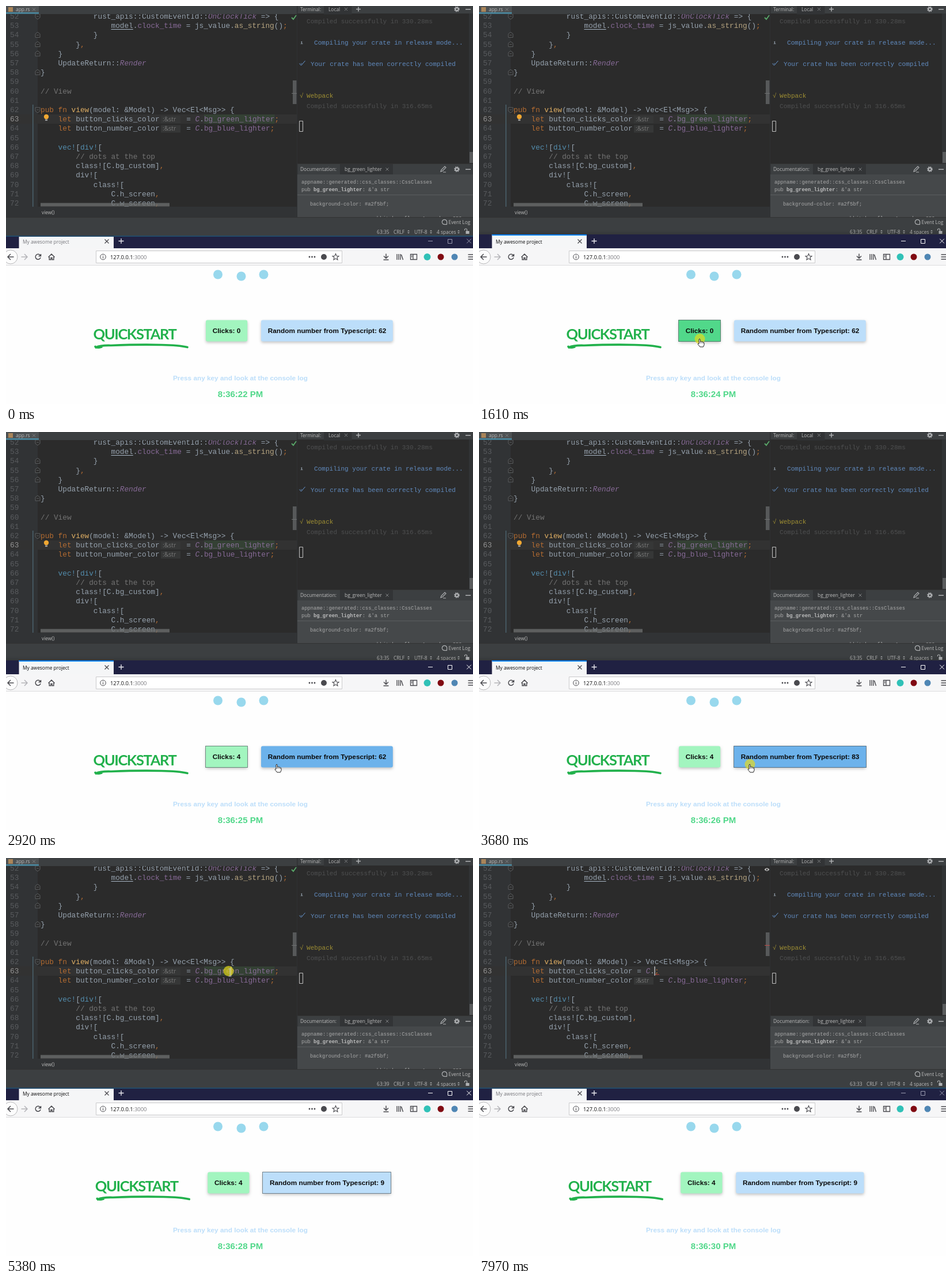
An HTML page with a canvas that plays this animation: 811x690 px, repeating every 8000 ms.

```html
<!DOCTYPE html>
<html lang="en">
<head>
<meta charset="utf-8">
<title>Quickstart demo</title>
<style>
html, body { margin: 0; width: 100%; height: 100%; overflow: hidden; background: #fff; }
canvas { display: block; }
</style>
</head>
<body>
<canvas id="stage" width="811" height="690"></canvas>
<script>
const ctx = document.getElementById('stage').getContext('2d');
const LOOP = 8000, CHAR = 7.656, LINE = 16.2;
const MONO = '"Liberation Mono", monospace';
const UI = '8.4px "Open Sans", sans-serif';
const CODE = '12.76px ' + MONO, TERM = '11.06px ' + MONO, DOC = '8.8px ' + MONO;
const BOLD = 'bold 11.8px "Liberation Sans", sans-serif';
const PLAIN = '#a9b7c6', KEY = '#cc7832', FIELD = '#9876aa', GREY = '#808080', LABEL = '#bbbbbb';

const TICKS = [230, 1230, 2230, 3220, 4220, 5150, 6210, 7200];
const PRESSES = [[1610, 1690], [1765, 1840], [2070, 2150], [2225, 2300],
  [3220, 3300], [3680, 3760], [3910, 3990], [5380, 5460], [5540, 5620]];
const PATH = [[150, 553, 688], [920, 383, 577], [2310, 383, 577], [2460, 450, 577], [2690, 470, 576],
  [4370, 470, 576], [4380, 470, 552], [5150, 386, 196]];

const between = (t, a, b) => t >= a && t < b;

function rect(x, y, w, h, color) {
  ctx.fillStyle = color;
  ctx.fillRect(x, y, w, h);
}

// Monospaced text is drawn lighter, like a thin typewriter face.
function text(s, x, y, color, font = UI, align = 'left') {
  ctx.font = font;
  ctx.textAlign = align;
  ctx.fillStyle = color;
  ctx.globalAlpha = font.includes('Mono') ? .85 : 1;
  ctx.fillText(s, x, y);
  ctx.globalAlpha = 1;
}

function disc(x, y, r, color) {
  ctx.beginPath();
  ctx.arc(x, y, r, 0, 7);
  ctx.fillStyle = color;
  ctx.fill();
}

// Strokes or fills an SVG path placed at x, y.
function shape(d, x, y, stroke, width = 1, fill) {
  const p = new Path2D(d);
  ctx.save();
  ctx.translate(x, y);
  if (fill) { ctx.fillStyle = fill; ctx.fill(p); }
  if (stroke) { ctx.strokeStyle = stroke; ctx.lineWidth = width; ctx.stroke(p); }
  ctx.restore();
}

const cross = (x, y, r, color, w) => shape(`M${-r} ${-r}L${r} ${r}M${r} ${-r}L${-r} ${r}`, x, y, color, w);
const plus = (x, y, r, color, w) => shape(`M${-r} 0H${r}M0 ${-r}V${r}`, x, y, color, w);

function gear(x, y) {
  ctx.setLineDash([1.8, 1.34]);
  shape('M4 0A4 4 0 1 1 -4 0A4 4 0 1 1 4 0', x, y, '#afb1b3', 1.6);
  ctx.setLineDash([]);
  shape('M2.6 0A2.6 2.6 0 1 1 -2.6 0A2.6 2.6 0 1 1 2.6 0', x, y, '#afb1b3', 2);
}

const lineY = n => 184 + (n - 62) * LINE;

// Writes alternating string / colour pairs; '/' before a colour means italic.
function code(n, x, ...parts) {
  for (let i = 0; i < parts.length; i += 2) {
    const italic = parts[i + 1][0] === '/';
    text(parts[i], x, lineY(n), parts[i + 1].replace('/', ''), (italic ? 'italic ' : '') + CODE);
    x += parts[i].length * CHAR;
  }
}

const col = c => 60 + c * CHAR;

function letLine(n, name, hint, value, bg) {
  code(n, col(4), 'let ', KEY, name, PLAIN);
  let x = col(27);
  if (hint) {
    rect(269, lineY(n) - 10, 34, 13, '#363737');
    text(':&str', 272, lineY(n) - .5, '#787878', '10.4px "Open Sans", sans-serif');
    x = 305.6;
  }
  if (bg) rect(344, 188, 122.5, 16, bg);
  const dot = value[0] === '.' ? '.' : '';
  code(n, x, ' = ', PLAIN, 'C', '/' + FIELD, dot, PLAIN, value.slice(dot.length), FIELD, ';', KEY);
}

function drawEditor(t) {
  rect(0, 0, 811, 400, '#3c3f41');
  rect(0, 14, 505, 334, '#2b2b2b');
  rect(0, 14, 55, 334, '#313335');
  rect(0, 188, 505, 16, '#323232');
  rect(46, 171, 1.5, 177, '#4a626d');

  ctx.save();
  ctx.beginPath();
  ctx.rect(0, 14, 505, 334);
  ctx.clip();
  for (let n = 52; n <= 72; n++) text(n, 7, lineY(n), n === 63 ? '#a4a3a3' : '#606366', CODE);
  for (const n of [52, 54, 55, 56, 58, 62]) {
    const up = n === 52 || n === 62;
    shape(up ? 'M-4 -4H4V2L0 5L-4 2ZM-2 0H2' : 'M-4 4H4V-2L0 -5L-4 -2ZM-2 0H2', 55, lineY(n) - 4, '#5c5f61', 1, '#2b2b2b');
  }
  code(52, col(12), 'rust_apis::CustomEventId::', PLAIN, 'OnClockTick', '/' + FIELD, ' => {', PLAIN);
  code(53, col(16), 'model', PLAIN, '.', PLAIN, 'clock_time', FIELD, ' = js_value.', PLAIN, 'as_string', '#d0bb90', '()', PLAIN, ';', KEY);
  rect(col(16), 40, 5 * CHAR, 1, PLAIN);
  code(54, col(12), '}', PLAIN);
  code(55, col(8), '}', PLAIN, ',', KEY);
  code(56, col(4), '}', PLAIN);
  code(57, col(4), 'UpdateReturn::', PLAIN, 'Render', '/' + FIELD);
  code(58, col(0), '}', PLAIN);
  code(60, col(0), '// View', GREY);
  code(62, col(0), 'pub fn ', KEY, 'view', '#ffc66d', '(model: &Model) -> Vec<El<Msg>> {', PLAIN);

  const erased = t >= 6720, selected = between(t, 5540, 6720);
  const value = !erased ? '.bg_green_lighter' : between(t, 7740, 7970) ? '' : '.';
  letLine(63, 'button_clicks_color', t < 7040, value, erased ? '' : selected ? '#214283' : '#344134');
  letLine(64, 'button_number_color', true, '.bg_blue_lighter');
  code(66, col(4), 'vec!', '#5b9fc6', '[', PLAIN, 'div!', '#5b9fc6', '[', PLAIN);
  code(67, col(8), '// dots at the top', GREY);
  code(68, col(8), 'class![C.bg_custom]', PLAIN, ',', KEY);
  code(69, col(8), 'div![', PLAIN);
  code(70, col(12), 'class![', PLAIN);
  code(71, col(16), 'C.h_screen', PLAIN, ',', KEY);
  code(72, col(16), 'C.w_screen', PLAIN, ',', KEY);
  ctx.restore();

  if (t < 5380 || between(t, 6160, 6720)) {
    disc(70, 192, 4.2, '#f0a732');
    rect(68, 196.5, 4, 2.5, '#9a9a9a');
  }
  if (t >= 7040) shape('M0 1L2 -1L4 1L6 -1L8 1', value ? 305 : 298, 202, '#bc3f3c', 1);
  if (t >= 5380 && !between(t, 6400, 6720)) {
    const x = t < 5540 ? 390 : t < 6720 ? 466 : t < 7040 ? 344 : value ? 304.5 : 297;
    rect(x, 188, 1.5, 16, '#bbbbbb');
  }

  rect(60, 341.5, 224, 6, 'rgba(110,112,113,.75)');
  rect(498, 129, 6.5, 41, '#57595a');
  rect(496, 151, 9, 1, t >= 7040 ? '#c24a45' : '#6f7172');
  if (!erased) shape('M-4 0L-1 3L4 -4', 500, 20, '#59a869', 1.8);
  else if (between(t, 7200, 7740)) disc(500, 20, 4, '#c75450');
  else {
    shape('M-4.5 0Q0 -5.5 4.5 0Q0 5.5 -4.5 0Z', 500, 20, null, 1, '#bcbcbc');
    disc(500, 20, 1.5, '#2b2b2b');
  }

  // tab strip and breadcrumb
  rect(0, 0, 57, 12, '#4e5254');
  rect(0, 11, 57, 2.5, '#4a8ba3');
  rect(4, 2, 8, 8, '#a9855a');
  text('app.rs', 17, 9, LABEL);
  cross(48.5, 6, 2.5, '#7f8183');
  rect(0, 348, 505, 18, '#313335');
  text('view()', 62, 361, LABEL);
}

function toolHeader(y, title, tab, tabX, tabEnd) {
  rect(tabX - 8, y - 9, tabEnd - tabX + 18, 18, '#323436');
  text(title, 511, y + 3, LABEL);
  text(tab, tabX, y + 3, LABEL);
  cross(tabEnd, y, 2.5, '#7f8183');
  gear(783, y);
  rect(798, y - .5, 9, 1.5, '#afb1b3');
}

function drawTools(t) {
  rect(505, 0, 1.5, 366, '#2f3133');
  rect(506, 13, 305, 260, '#2b2b2b');
  toolHeader(5.5, 'Terminal:', 'Local', 560, 590.5);
  plus(612, 5.5, 4, '#afb1b3', 1.5);
  const blue = '#6a9bd8', dim = '#555657', gold = '#b3a035';
  text('Compiled successfully in 330.28ms', 522, 30, dim, TERM);
  text('i', 511, 66, '#a9b7c6', 'bold 8px ' + MONO);
  text('Compiling your crate in release mode...', 535, 67, blue, TERM);
  shape('M-5 0L-2 3.5L5 -4.5M-2.5 -.5L-1 1', 514.5, 99.5, blue, 1);
  text('Your crate has been correctly compiled', 529, 103.5, blue, TERM);
  text('√', 510, 159, gold, TERM);
  text('Webpack', 522, 159, gold, TERM);
  text('Compiled successfully in 316.65ms', 522, 177, dim, TERM);
  shape('M0 0H6V18H0Z', 509.5, 199.5, '#c0c0c0', 1);
  rect(804, 13, 7, 260, '#313335');
  rect(805, 253, 6, 19, '#5a5c5d');

  rect(506, 273, 305, 1, '#323232');
  toolHeader(283, 'Documentation:', 'bg_green_lighter', 588, 662);
  shape('M-4 4L-3 1L3 -5L5 -3L-1 3ZM0 5H5', 759, 283, '#afb1b3', 1.2);
  rect(506, 292, 305, 74, '#45484a');
  text('appname::generated::css_classes::CssClasses', 513, 307.5, LABEL, DOC);
  text('pub ', 513, 321, LABEL, DOC);
  text('bg_green_lighter', 534, 321, '#d0d0d0', 'bold ' + DOC);
  text(": &'a str", 618.7, 321, LABEL, DOC);
  rect(506, 327, 305, 1, '#5b5e60');
  text('background-color: #a2f5bf;', 528, 346, LABEL, DOC);
  if (t < 6720) {
    ctx.save();
    ctx.beginPath();
    ctx.rect(506, 360, 290, 6);
    ctx.clip();
    text('-webkit-box-flex: 1; order: 359', 628, 371, LABEL, DOC);
    ctx.restore();
  }

  // status bar
  rect(0, 366, 811, 1, '#323232');
  shape('M4.2 0A4.2 4.2 0 1 0 0 4.2H4Z', 761.5, 374.5, '#afb1b3', 1.2);
  text('Event Log', 768.5, 378, LABEL);
  const pos = t < 5380 ? '63:35' : t < 5540 ? '63:39' : t < 6720 ? '16 chars' : between(t, 7740, 7970) ? '63:32' : '63:33';
  text(pos, 665.5, 394.5, LABEL, UI, 'right');
  text('CRLF', 673, 394.5, LABEL);
  text('UTF-8', 709, 394.5, LABEL);
  text('4 spaces', 748, 394.5, LABEL);
  for (const x of [699, 738, 786]) shape('M-2 -1L0 -3L2 -1ZM-2 1L0 3L2 1Z', x, 391.5, null, 1, '#afb1b3');
  shape('M-4 -1V-2A2 2 0 0 1 0 -2V0', 800.5, 390, '#afb1b3', 1.2);
  rect(798.5, 390, 6, 5, '#afb1b3');
}

function drawChrome(t) {
  const front = between(t, 1610, 5380), active = between(t, 1610, 5460);
  const top = front ? 396 : 400, dark = '#4a4a4f', white = active ? '#ffffff' : '#9a9bb0';
  if (front) {
    const g = ctx.createLinearGradient(0, 388, 0, 396);
    g.addColorStop(0, 'rgba(0,0,0,0)');
    g.addColorStop(1, 'rgba(0,0,0,.12)');
    rect(0, 388, 811, 8, g);
  } else rect(0, 398, 811, 2, '#234a68');
  rect(0, top, 811, 420 - top, '#202142');
  rect(22.5, top, 164.5, 420 - top, '#f5f6f7');
  if (front) rect(22.5, 396, 164.5, 2, '#0a84ff');
  text('My awesome project', 29, 411.5, active ? '#0c0c0d' : '#75757a');
  cross(175, 408, 3.5, dark, 1.3);
  plus(200, 407.5, 4.5, '#f0f0f4', 1.3);
  rect(733, 407, 8, 1, white);
  shape('M-3.5 -3.5H3.5V3.5H-3.5Z', 771, 408, white);
  cross(804, 407.5, 3.8, white);

  rect(0, 420, 811, 29, '#f6f6f7');
  rect(0, 449, 811, 1, '#dcdcde');
  shape('M12 0A12 12 0 1 1 -12 0A12 12 0 1 1 12 0', 8, 435, '#b8b8ba', 1, '#fcfcfc');
  shape('M5.5 0H-5M0 -5L-5 0L0 5', 8, 435, dark, 1.5);
  shape('M-5.5 0H5M0 -5L5 0L0 5', 32, 435, '#b4b4b8', 1.5);
  shape('M4 -2.5A4.5 4.5 0 1 0 4.5 1M5 -5V-1.5H1', 55.5, 435, dark, 1.5);
  shape('M-5.5 .5L0 -5L5.5 .5M-3.8 0V4.8H-1V1.5H1V4.8H3.8V0', 79, 435, dark, 1.5);
  shape('M0 0H427V21H0Z', 156.5, 424.5, '#c9c9cb', 1, '#ffffff');
  shape('M4.8 0A4.8 4.8 0 1 1 -4.8 0A4.8 4.8 0 1 1 4.8 0M0 -1V2.8M0 -3V-1.8', 168.5, 435, dark, 1);
  const url = '9.4px "Open Sans", sans-serif';
  text('127.0.0.1', 181, 438.5, '#0c0c0d', url);
  text(':3000', 220.5, 438.5, '#77777c', url);
  for (const x of [527, 531.5, 536]) disc(x, 435, 1.4, dark);
  disc(552, 435, 5, dark);
  shape('M0 -5.5L1.6 -1.8L5.5 -1.5L2.5 1L3.5 5L0 2.8L-3.5 5L-2.5 1L-5.5 -1.5L-1.6 -1.8Z', 572.5, 435, dark, 1.1);
  shape('M0 -5.5V2M-4 -1.5L0 2.5L4 -1.5M-4.5 5H4.5', 660, 435, dark, 1.5);
  shape('M-5 -5V5M-2 -5V5M1 -5V5M2.5 -4L5.5 5', 684, 435, dark, 1.4);
  shape('M-5.5 -4.5H5.5V4.5H-5.5ZM-1 -4.5V4.5M-4 -2H-2.5M-4 0H-2.5', 708, 435, dark, 1.3);
  disc(731.5, 435, 6, '#30c1b7');
  disc(755, 435, 5.5, '#800a12');
  disc(779, 435, 5.5, '#4f86b4');
  shape('M0 -4H10M0 0H10M0 4H10', 802.5, 435, dark, 1.5);
}

function button(b, color, focused) {
  ctx.save();
  ctx.shadowColor = 'rgba(0,0,0,.24)';
  ctx.shadowBlur = 5;
  ctx.shadowOffsetY = 2.2;
  ctx.fillStyle = color;
  ctx.beginPath();
  ctx.roundRect(b.x, 544.5, b.w, 37, 3);
  ctx.fill();
  ctx.restore();
  if (focused) {
    const x = Math.round(b.x) - .5, w = Math.round(b.w) + 1;
    rect(x, 544, w, 38, color);
    ctx.strokeStyle = 'rgba(70,80,85,.65)';
    ctx.lineWidth = 1;
    ctx.strokeRect(x, 544.5, w, 37);
  }
  text(b.label, b.x + 11.73, 566.8, '#0a0a0a', BOLD);
}

function drawPage(t, tip) {
  rect(0, 450, 811, 240, '#fefefe');
  for (const [x, y] of [[368, 465.5], [408.5, 468.5], [447.5, 465.5]]) disc(x, y, 8, '#98d8ed');

  const clicks = PRESSES.slice(0, 4).filter(p => t >= p[1]).length;
  const random = t < 3300 ? 62 : t < 3760 ? 83 : t < 3990 ? 47 : 9;
  const shift = random < 10 ? 3.26 : 0;
  const a = { x: 347 + shift, w: 72.2, label: 'Clicks: ' + clicks };
  const b = { x: 443 + shift, w: 228.8 - 2 * shift, label: 'Random number from Typescript: ' + random };
  const over = k => tip && t < 5380 && tip.x >= k.x && tip.x <= k.x + k.w && tip.y >= 544 && tip.y <= 582;

  ctx.letterSpacing = '-1.4px';
  text('QUICKSTART', 151.5 + shift, 577.5, '#22b14c', 'bold 25.5px Lato, sans-serif');
  ctx.letterSpacing = '0px';
  ctx.lineCap = ctx.lineJoin = 'round';
  shape('M4 5Q12 1 30 1.5Q80 -.5 118 .5Q148 1 163 4.5M3 3.5Q6 6.5 14 4', 152 + shift, 587, '#22b14c', 3.7);
  ctx.lineCap = 'butt';
  ctx.lineJoin = 'miter';

  button(a, over(a) ? '#51d88a' : '#a2f5bf', between(t, 1610, 3220));
  button(b, over(b) && t >= 2530 ? '#6cb2eb' : '#bcdefa', between(t, 3220, 5460));

  text('Press any key and look at the console log', 407, 649, '#bcdefa', BOLD, 'center');
  const sec = 22 + TICKS.filter(k => t >= k).length;
  text(`8:36:${sec} PM`, 407, 678.3, '#51d88a', 'bold 15px "Liberation Sans", sans-serif', 'center');
  return over(a) || over(b);
}

function pointer(t) {
  if (t < 150 || t >= 6570) return null;
  const s = Math.floor((t + 10) / 77) * 77;
  const i = PATH.findIndex(p => p[0] > s);
  if (i <= 0) {
    const [, x, y] = PATH.at(i);
    return { x, y };
  }
  const [t0, x0, y0] = PATH[i - 1], [t1, x1, y1] = PATH[i];
  let k = (s - t0) / (t1 - t0);
  k = k * k * (3 - 2 * k);
  return { x: x0 + (x1 - x0) * k, y: y0 + (y1 - y0) * k };
}

function drawPointer(t, tip, hand) {
  if (PRESSES.some(p => between(t, ...p))) disc(tip.x + .5, tip.y, 9, 'rgba(232,220,25,.68)');
  if (hand) {
    shape('M-1 1Q0 -1 1.2 1V5Q3 4 4 5.2Q6 4.8 6.6 6Q8 6 8 7.5V10.5L6.5 14H.8L-2.8 9.5Q-3 7.5 -1 8.5Z', tip.x, tip.y, '#202020', 1, '#ffffff');
    shape('M1.2 5V8M4 5.5V8M6.4 6.2V8', tip.x, tip.y, '#303030', .8);
  } else if (tip.y < 348) {
    shape('M-2.5 -4H2.5M0 -4V9M-2.5 9H2.5', tip.x + 3, tip.y, '#c8c8c8', 1);
  } else {
    shape('M0 0V12L2.8 9.4L4.7 13.6L6.5 12.8L4.7 8.8H8.5Z', tip.x, tip.y, '#202020', .9, '#ffffff');
  }
}

function draw(now) {
  const t = now % LOOP, tip = pointer(t);
  drawEditor(t);
  drawTools(t);
  drawChrome(t);
  const hand = drawPage(t, tip);
  if (tip) drawPointer(t, tip, hand);
}

const start = performance.now();
function frame() {
  draw(performance.now() - start);
  requestAnimationFrame(frame);
}
frame();
</script>
</body>
</html>
```
